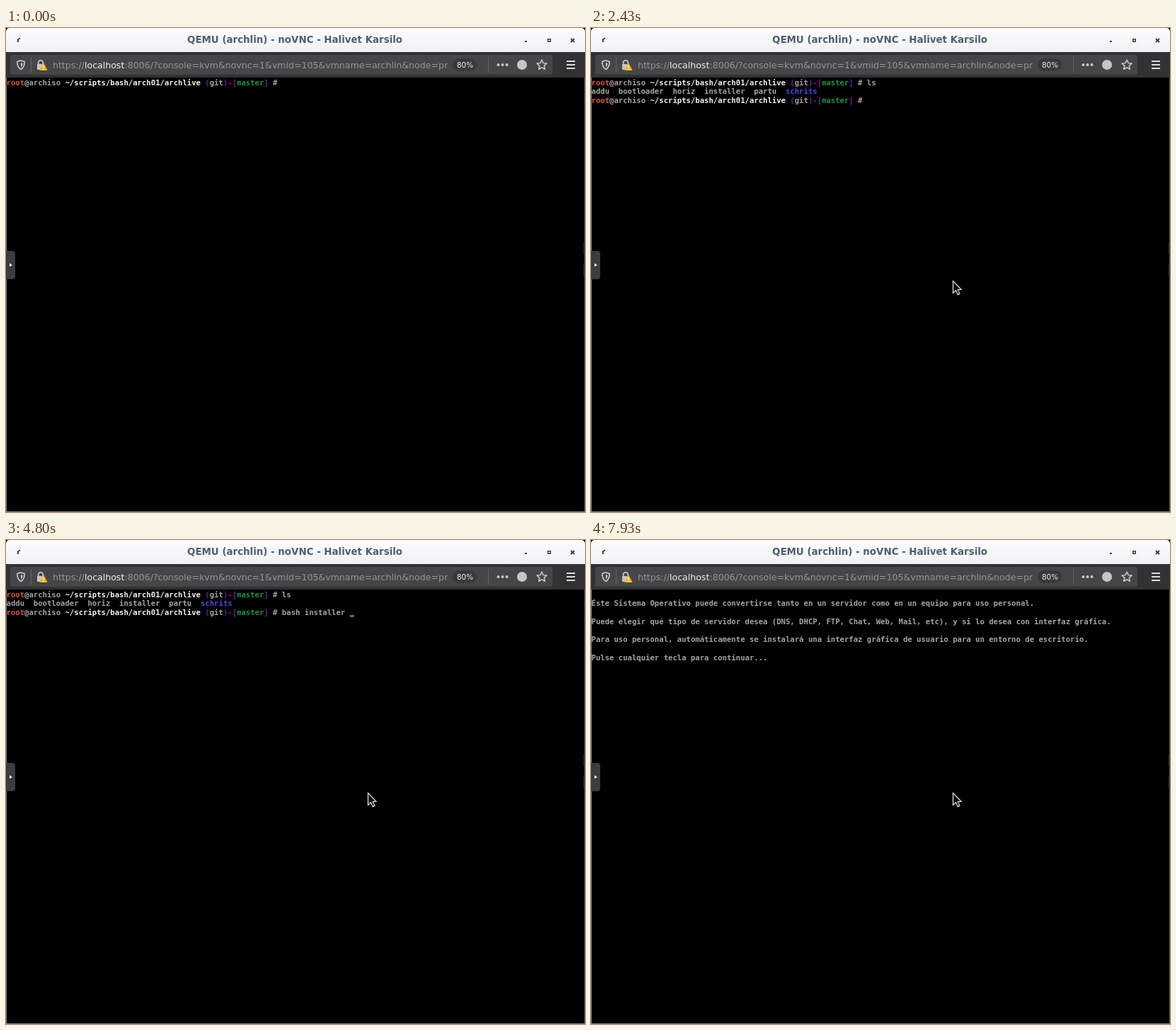
Write an HTML page with a canvas that moves like this. It is 818 px wide and 684 px high and loops after 8000 ms.

```html
<!DOCTYPE html>
<html lang="es">
<head>
<meta charset="utf-8">
<title>Terminal</title>
<style>
html, body { margin: 0; width: 100%; height: 100%; overflow: hidden; background: #000; }
canvas { display: block; }
</style>
</head>
<body>
<canvas id="stage" width="818" height="684"></canvas>
<script>
const W = 818, H = 684, LOOP = 8000;
const COL = 6.383, ROW = 12.77, BASE = 80.5;
const ctx = document.getElementById('stage').getContext('2d');
const SANS = '"DejaVu Sans", sans-serif';
const MONO = 'bold 10.6px "DejaVu Sans Mono", monospace';

const TITLE_BG = ctx.createLinearGradient(0, 0, 0, 34);
TITLE_BG.addColorStop(0, '#fcfcfd');
TITLE_BG.addColorStop(1, '#f0f1f3');
const GRAY = '#a4a4a4', WHITE = '#f2f2f2', PURPLE = '#8410a4';
const ICON = '#c6c6c8', TINY = '#3a4248', RULE = '#66666a';

const PROMPT = [
  ['root', '#e4503e'], ['@archiso ', GRAY], ['~/scripts/bash/arch01/archlive ', WHITE],
  ['(', PURPLE], ['git', GRAY], [')-[', PURPLE], ['master', '#129a3c'],
  ['] ', PURPLE], ['# ', GRAY]
];
const LISTING = [['addu  bootloader  horiz  installer  partu  ', GRAY], ['schrits', '#4c48e8']];
const INTRO = [
  'Éste Sistema Operativo puede convertirse tanto en un servidor como en un equipo para uso personal.',
  'Puede elegir qué tipo de servidor desea (DNS, DHCP, FTP, Chat, Web, Mail, etc), y si lo desea con interfaz gráfica.',
  'Para uso personal, automáticamente se instalará una interfaz gráfica de usuario para un entorno de escritorio.',
  'Pulse cualquier tecla para continuar...'
];

// [time, text after the prompt]
const FIRST = [[-250, ''], [1200, 'l'], [1400, 'ls']];
const LISTED = 2200;
const SECOND = [
  [LISTED, ''], [3080, 'b'], [3230, 'ba'], [3430, 'bas'], [3560, 'bash'], [3700, 'bash '],
  [3900, 'bash i'], [4050, 'bash in'], [4370, 'bash installer ']
];
const CLEARED = 4970, INTRO_BLINK = 4800;

const lastKey = (keys, t) => keys.filter(k => k[0] <= t).pop();

function label(text, x, y, font, color, align = 'left') {
  ctx.font = font;
  ctx.fillStyle = color;
  ctx.textAlign = align;
  ctx.fillText(text, x, y);
}

function box(x, y, w, h, color, r = 0) {
  ctx.fillStyle = color;
  ctx.beginPath();
  ctx.roundRect(x, y, w, h, r);
  ctx.fill();
}

function shape(points, fill, stroke, width = 1) {
  ctx.beginPath();
  points.forEach(([x, y]) => ctx.lineTo(x, y));
  ctx.closePath();
  if (fill) { ctx.fillStyle = fill; ctx.fill(); }
  if (stroke) { ctx.strokeStyle = stroke; ctx.lineWidth = width; ctx.stroke(); }
}

function dot(x, y, r, color) {
  ctx.fillStyle = color;
  ctx.beginPath();
  ctx.arc(x, y, r, 0, Math.PI * 2);
  ctx.fill();
}

function titleBar() {
  box(0, 0, W, 34, TITLE_BG, [5, 5, 0, 0]);
  label('QEMU (archlin) - noVNC - Halivet Karsilo', 256, 21, 'bold 13.4px ' + SANS, '#4f5d70');
  box(16, 15, 2, 5, TINY);
  box(18, 14, 2, 2, TINY);
  box(733, 18, 3, 2, TINY);
  ctx.strokeStyle = TINY;
  ctx.lineWidth = 1.5;
  ctx.strokeRect(765.75, 15.75, 3.5, 3.5);
  ctx.lineWidth = 2;
  ctx.beginPath();
  ctx.moveTo(798, 15); ctx.lineTo(803, 20);
  ctx.moveTo(803, 15); ctx.lineTo(798, 20);
  ctx.stroke();
}

function shield() {
  ctx.strokeStyle = ICON;
  ctx.lineWidth = 1.7;
  ctx.beginPath();
  ctx.moveTo(21, 46);
  ctx.lineTo(26, 47.5);
  ctx.quadraticCurveTo(26.5, 55, 21, 58.5);
  ctx.quadraticCurveTo(15.5, 55, 16, 47.5);
  ctx.closePath();
  ctx.stroke();
  shape([[21, 49], [23.5, 49.7], [23, 53], [21, 55.5]], ICON);
}

function lock() {
  ctx.strokeStyle = ICON;
  ctx.lineWidth = 1.8;
  ctx.beginPath();
  ctx.arc(49, 49, 3.3, Math.PI, 0);
  ctx.moveTo(45.7, 49); ctx.lineTo(45.7, 52);
  ctx.moveTo(52.3, 49); ctx.lineTo(52.3, 52);
  ctx.stroke();
  box(44, 51, 10, 8, ICON, 1);
  shape([[53, 50], [58, 59.5], [48, 59.5]], '#f4b21c', '#f4b21c');
  box(52.4, 53, 1.3, 3.4, '#fff');
  box(52.4, 57.4, 1.3, 1.3, '#fff');
}

function star(cx, cy) {
  const points = Array.from({ length: 10 }, (_, i) => {
    const a = i * Math.PI / 5 - Math.PI / 2, r = i % 2 ? 3.5 : 7.3;
    return [cx + r * Math.cos(a), cy + r * Math.sin(a)];
  });
  ctx.lineJoin = 'round';
  shape(points, null, ICON, 1.6);
  ctx.lineJoin = 'miter';
}

function toolBar() {
  box(0, 34, W, 36, '#323234');
  box(6, 38, 766, 28, '#464648', 3);
  shield();
  box(35, 41, 1, 22, RULE);
  lock();
  const font = '12.55px ' + SANS, dim = '#949498';
  label('https://', 66, 57, font, dim);
  label('localhost', 111, 57, font, '#eeeeee');
  label(':8006/?console=kvm&novnc=1&vmid=105&vmname=archlin&node=pr', 167.5, 57, font, dim);
  box(631, 43, 34, 18, '#39393b', 9);
  label('80%', 648.5, 56, '10.4px ' + SANS, '#eeeeee', 'center');
  box(681, 41, 1, 22, RULE);
  [695.5, 701.5, 707.5].forEach(x => dot(x, 52, 2, ICON));
  dot(729, 52, 7, ICON);
  star(757, 52.3);
  [46, 51, 56].forEach(y => box(792, y, 12, 2, '#dadadc'));
}

function frameEdges() {
  box(0, 70, 1, 614, '#7c7c80');
  box(817, 70, 1, 614, '#58585c');
  box(0, 683, W, 1, '#7c7c80');
  box(0, 315, 13, 40, '#3c3c3e', [0, 4, 4, 0]);
  shape([[5, 332.5], [9, 335], [5, 337.5]], '#f0f0f0');
  box(816, 303, 2, 17, '#38383c');
  box(816, 334, 2, 17, '#38383c');
}

// Draws coloured runs on the character grid and returns the next column.
function line(row, runs) {
  let col = 0;
  for (const [text, color] of runs)
    for (const ch of text)
      label(ch, 0.5 + COL * col++, BASE + ROW * row, MONO, color);
  return col;
}

function cursor(col, row, t, since) {
  if ((t - since + LOOP) % 400 < 200)
    box(0.5 + COL * col, BASE + ROW * row + 0.6, COL, 1.6, '#b0b0b0');
}

function terminal(t) {
  if (t >= CLEARED) {
    INTRO.forEach((text, i) => line(1 + 2 * i, [[text, GRAY]]));
    cursor(INTRO[3].length, 7, t, INTRO_BLINK);
    return;
  }
  const [time, typed] = lastKey(FIRST, t);
  const col = line(0, [...PROMPT, [typed, GRAY]]);
  if (t < LISTED) {
    cursor(col, 0, t, time);
    return;
  }
  line(1, LISTING);
  const [time2, typed2] = lastKey(SECOND, t);
  cursor(line(2, [...PROMPT, [typed2, GRAY]]), 2, t, time2);
}

function pointer(t) {
  if (t < 60) return;
  const k = Math.pow(1 - Math.min(1, (t - 60) / 400), 2);
  const nudge = t < 600 ? 0 : 1;
  const x = 512.5 + 305 * k - nudge, y = 358.5 + 204 * k - nudge;
  const outline = [[0, 0], [0, 17], [4, 13.3], [6.6, 19.3], [9.4, 18.2], [6.8, 12.4], [11.5, 12]];
  shape(outline.map(([dx, dy]) => [x + dx, y + dy]), '#0c0c0c', '#dcdcdc', 1.3);
}

function draw(t) {
  ctx.fillStyle = '#000';
  ctx.fillRect(0, 0, W, H);
  titleBar();
  toolBar();
  terminal(t);
  frameEdges();
  pointer(t);
}

const start = performance.now();
function tick() {
  draw((performance.now() - start) % LOOP);
  requestAnimationFrame(tick);
}
tick();
</script>
</body>
</html>
```
